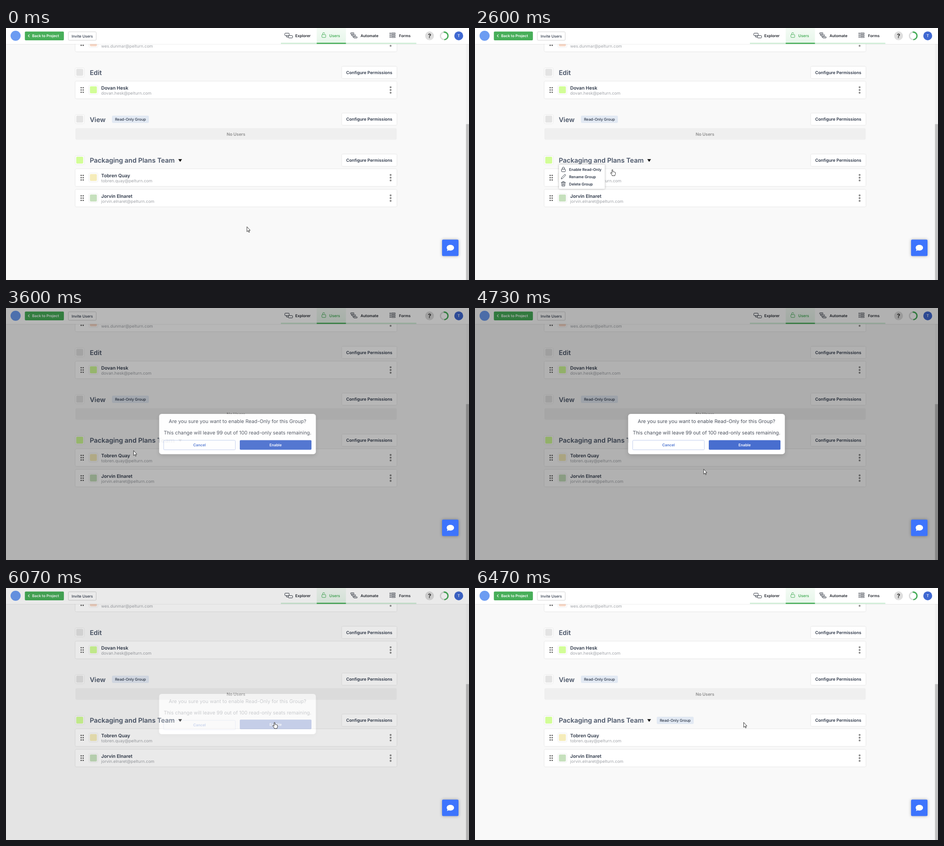
An HTML page for the animation above (8590 ms loop, 1014x552 px).

```html
<!DOCTYPE html>
<html lang="en">
<head>
<meta charset="utf-8">
<title>Group permissions</title>
<style>
html, body { margin: 0; width: 100%; height: 100%; overflow: hidden; background: #f9f9f9; }
svg { display: block; width: 100%; height: 100%; font-family: Inter, Roboto, sans-serif; text-rendering: geometricPrecision; }
.soft { filter: drop-shadow(0 .7px .8px rgba(0,0,0,.16)); }
.pop { filter: drop-shadow(0 .8px 2px rgba(0,0,0,.3)); }
.float { filter: drop-shadow(0 3px 5px rgba(0,0,0,.14)); }
.halo { filter: drop-shadow(0 0 3px rgba(0,0,0,.3)); }
.line { fill: none; stroke-linejoin: round; stroke-linecap: round; }
</style>
</head>
<body>
<svg id="stage" viewBox="0 0 1014 552"></svg>
<script>
const LOOP = 8590;
const INK = '#2d3748', SLATE = '#4a5568', GREEN = '#47ae59';
const BLUE = '#486ecf', DEEP_BLUE = '#3d5fbd';

const rect = (x, y, w, h, fill, r = 2, extra = '') =>
  `<rect x="${x}" y="${y}" width="${w}" height="${h}" rx="${r}" fill="${fill}" ${extra}/>`;
const dot = (x, y, r, fill) => `<circle cx="${x}" cy="${y}" r="${r}" fill="${fill}"/>`;
const text = (str, x, y, size, weight, fill, anchor = 'start', extra = '') =>
  `<text x="${x}" y="${y}" font-size="${size}" font-weight="${weight}" fill="${fill}" text-anchor="${anchor}" ${extra}>${str}</text>`;
const line = (d, color, width = 1) =>
  `<path class="line" d="${d}" stroke="${color}" stroke-width="${width}"/>`;
const group = (id, body) => `<g id="${id}">${body}</g>`;

function swatch(cx, cy, color) {
  return rect(cx - 9.3, cy - 9.3, 18.6, 18.6, '#fff', 2, 'class="soft"') +
    rect(cx - 7.6, cy - 7.6, 15.2, 15.2, color, 2);
}

function userCard(cy, name, mail, color) {
  let out = rect(152, cy - 18.8, 703.7, 37.4, '#fff', 2.5, 'class="soft"');
  for (const dy of [-5, 0, 5])
    out += dot(164.6, cy + dy, 1.4, '#4a4a4a') + dot(169, cy + dy, 1.4, '#4a4a4a');
  for (const dy of [-6, 0, 6]) out += dot(842.3, cy + dy, 2.1, '#8c8c8c');
  return out + swatch(191.4, cy - .4, color) +
    text(name, 208.5, cy - 1.2, 10.24, 600, INK) +
    text(mail + '@pelturn.com', 208.5, cy + 10.2, 9.1, 400, '#a0a3a8');
}

function groupHead(cy, title, color, id) {
  return swatch(161.4, cy - .3, color) +
    text(title, 183.4, cy + 5.6, 14.4, 600, SLATE, 'start', id ? `id="${id}"` : '') +
    rect(735.7, cy - 13, 120, 25.6, '#fff', 2, 'class="soft"') +
    text('Configure Permissions', 795.5, cy + 3.3, 9.216, 600, INK, 'middle');
}

const badge = (x, y) => rect(x, y, 81, 16, '#e2e9f3', 3) +
  text('Read-Only Group', x + 40.5, y + 11, 8.19, 500, INK, 'middle');

function page() {
  return rect(0, 0, 1014, 552, '#f9f9f9', 0) +
    userCard(33, '', 'wes.dunmar', '#f6d7c6') +
    groupHead(97.5, 'Edit', '#e4e4e4') +
    userCard(135.8, 'Dovan Hesk', 'dovan.hesk', '#d2fd97') +
    groupHead(200, 'View', '#e4e4e4') + badge(232, 192) +
    rect(152, 219.5, 703.7, 25.2, '#efefef', 3) +
    text('No Users', 503.6, 235.6, 9.216, 600, '#8c8c8c', 'middle') +
    groupHead(289.8, 'Packaging and Plans Team', '#d2fd97', 'title') +
    '<path d="M377.3 287.2h8.2l-4.1 6z" fill="#111"/>' +
    group('newBadge', badge(398, 282)) +
    userCard(327.9, 'Tobren Quay', 'tobren.quay', '#f5ecba') +
    userCard(372.7, 'Jorvin Elnaret', 'jorvin.elnaret', '#c6e0bd') +
    rect(1007.5, 35, 6.5, 517, '#f1f1f1', 0) + rect(1007.5, 210.5, 6.5, 341.5, '#c1c1c1', 0);
}

function navIcons() {
  const dark = '#2f3540';
  let out = rect(610.6, 11.3, 9.6, 5.4, 'none', 1.2, `stroke="${dark}"`) +
    line('M614.3 16.7v3.1h4', dark) +
    rect(618.4, 16.6, 9.2, 5.2, 'none', 1.2, `stroke="${dark}"`) +
    rect(691.8, 14.5, 8.4, 6.2, 'none', 1, `stroke="${GREEN}"`) +
    line('M693.6 14.3v-1.8a2.2 2.2 0 0 1 4.4-.3', GREEN);
  for (let i = 0; i < 3; i++) {
    out += rect(754.6 + 3.5 * i, 10.4 + 4.4 * i, 7.6, 2.7, 'none', 1, `stroke="${dark}"`);
    const y = 10.7 + 4 * i;
    out += rect(840.4, y, 2, 2, 'none', .6, `stroke="${dark}" stroke-width=".9"`) +
      rect(844, y, 8.6, 2.2, 'none', .6, `stroke="${dark}" stroke-width=".9"`);
  }
  return out + line('M756.5 13.5v2.8h1M760 18v2.7h1', dark, .8);
}

function header() {
  const nav = (str, x, color = '#20242c') => text(str, x, 19.6, 8.35, 600, color);
  return '<linearGradient id="tab" x2="0" y2="1"><stop stop-color="#f4fbf5"/><stop offset="1" stop-color="#e6f6e9"/></linearGradient>' +
    rect(0, 0, 1014, 35, '#fff', 0, 'class="soft"') +
    dot(21, 17, 11, '#6c9cf2') +
    rect(41.3, 7.8, 85.5, 19.2, GREEN) +
    line('M51 14.7l-2.3 2.5 2.3 2.5', '#fff', 1.2) +
    text('Back to Project', 57.2, 20.4, 8.15, 600, '#fff') +
    rect(136.5, 8.3, 61, 18.6, '#fff', 2, 'stroke="#cfcfcf" stroke-width=".9"') +
    text('Invite Users', 167, 20.8, 8.19, 500, INK, 'middle') +
    rect(602, 32.3, 296.7, 2.6, '#cfeed6', 0) +
    rect(680.5, 0, 64, 33, 'url(#tab)', 0) + rect(680.5, 32.3, 64, 2.6, GREEN, 0) +
    navIcons() +
    nav('Explorer', 633.5) + nav('Users', 708, GREEN) + nav('Automate', 776.4) + nav('Forms', 860.8) +
    dot(927.6, 17.2, 9.6, '#dedede') + text('?', 927.6, 21.9, 13, 700, '#333', 'middle') +
    '<circle cx="959.7" cy="17.2" r="8.2" fill="none" stroke="#dcdcdc" stroke-width="2.8"/>' +
    line('M959.7 9a8.2 8.2 0 0 1 1.4 16.3', GREEN, 2.8) +
    dot(991.5, 17.2, 9.7, '#4069d2') + text('T', 991.5, 20.3, 8.4, 500, '#fff', 'middle');
}

function menu() {
  const item = (str, y) => text(str, 206, y, 8.22, 600, INK);
  const ink = '#333a46';
  return rect(184, 299, 100.3, 53.5, '#fff', 2, 'class="pop"') +
    rect(189.4, 309.2, 8.4, 5.6, 'none', 1, `stroke="${ink}"`) +
    line('M191.2 309v-1.8a2.4 2.4 0 0 1 4.8 0v1.8', ink) +
    line('M189 330.2l.6-2.6 6.5-6.4q1-.8 1.9.1t0 1.9l-6.4 6.4z', ink) +
    line('M188.8 338.2h9.4M191.7 338v-1.3h3.6v1.3M189.9 338.4l.5 7.8h6.2l.5-7.8M192.4 340.4v3.8M194.6 340.4v3.8', ink) +
    item('Enable Read-Only', 312.8) + item('Rename Group', 328.7) + item('Delete Group', 344.7);
}

function dialog() {
  const msg = (str, y) => text(str, 507, y, 10.83, 400, '#4a505c', 'middle');
  return rect(0, 0, 1014, 552, '#000', 0, 'opacity=".305"') +
    rect(335.4, 232, 343.2, 88.2, '#fff', 5.5, 'class="float"') +
    msg('Are you sure you want to enable Read-Only for this Group?', 251.7) +
    msg('This change will leave 99 out of 100 read-only seats remaining.', 277.3) +
    rect(345.3, 289.8, 157, 20.8, '#fff', 2, 'stroke="#b9c7ea" stroke-width=".9"') +
    text('Cancel', 423.8, 303, 8.19, 600, '#4a72d0', 'middle') +
    group('enable', rect(512, 289.5, 157, 21, BLUE, 2, 'id="enableBox"') +
      text('Enable', 590.4, 303, 8.19, 600, '#fff', 'middle'));
}

const chat = () => rect(955, 463.5, 36, 36, '#3d74fd', 2.5, 'class="halo"') +
  '<path d="M973.2 475c4.6 0 8 2.7 8 6.3s-3.4 6.3-8 6.3c-1.3 0-2.5-.2-3.600-.6l-3.800 1.600 1-3.300c-1-1.100-1.600-2.500-1.600-4 0-3.600 3.400-6.300 8-6.300z" fill="#fff"/>';

const cursors = () =>
  '<g id="cursor" fill="#fff" stroke="#222" stroke-width=".9" stroke-linejoin="round">' +
  '<path id="arrow" d="M.4.3V11.2L2.9 8.9 4.6 12.7 6.1 12 4.5 8.3H7.6Z"/>' +
  '<path id="hand" d="M-.9 1.4a1 1 0 0 1 2 0V5q1.6-.7 2 .4 1.5-.5 1.9.6 1.6-.3 1.7 1V9.6q0 1.500-1 2.700V13.800H-.6V12.500L-3.700 8.400q-.5-1.500.9-1.500.8.2 1.900 1.800Z"/></g>';

document.getElementById('stage').innerHTML = page() + header() + group('menu', menu()) +
  group('dialog', dialog()) + chat() + cursors();
const $ = id => document.getElementById(id);
const show = (id, on) => $(id).setAttribute('visibility', on ? 'visible' : 'hidden');

// Pointer strokes: first step, last step, step count, then start, control and end points.
const strokes = [
  [400, 1130, 12, [527.3, 435], [453.5, 361.5], [380, 288]],
  [2330, 2730, 7, [380, 288], [335, 308], [279, 312]],
  [4270, 4930, 11, [279, 312], [470, 404], [567.5, 316]],
  [5070, 5670, 9, [567.5, 316], [592, 237], [588, 294]]
];

function pointerAt(t) {
  let pos = strokes[0][3];
  for (const [t0, t1, n, a, b, c] of strokes) {
    if (t < t0) break;
    const step = Math.min(n, Math.floor((t - t0) / (t1 - t0) * (n - 1) + 1e-6) + 1);
    const p = step / n, u = p * p * (3 - 2 * p), v = 1 - u;
    pos = [0, 1].map(i => v * v * a[i] + 2 * u * v * b[i] + u * u * c[i]);
  }
  return pos;
}

// Dialog opacity is held between these moments.
const fades = [[3530, .11], [3600, .93], [3670, 1], [6070, .27], [6130, .03], [6200, 0]];
const fadeAt = t => fades.reduce((value, [at, next]) => t >= at ? next : value, 0);

const inside = ([x, y], x0, y0, x1, y1) => x >= x0 && x <= x1 && y >= y0 && y <= y1;

function draw(t) {
  const pos = pointerAt(t), fade = fadeAt(t);
  const onTitle = t < 3530 && inside(pos, 184, 282, 388, 300);
  const onEnable = t >= 3600 && t < 6200 && inside(pos, 512, 289, 669, 310);
  const hand = (t >= 1270 && t < 3530) || onEnable;

  $('title').setAttribute('fill', onTitle ? INK : SLATE);
  show('menu', t >= 1530 && t < 3530);
  show('newBadge', t >= 6470);
  show('dialog', fade > 0);
  $('dialog').setAttribute('opacity', fade);
  $('enable').setAttribute('transform', `translate(0 ${onEnable ? -1.2 : 0})`);
  $('enableBox').setAttribute('fill', onEnable ? DEEP_BLUE : BLUE);
  show('arrow', !hand);
  show('hand', hand);
  $('cursor').setAttribute('transform', `translate(${pos[0]} ${pos[1]})`);
}

const start = performance.now();
function tick() {
  draw((performance.now() - start) % LOOP);
  requestAnimationFrame(tick);
}
tick();
</script>
</body>
</html>
```
